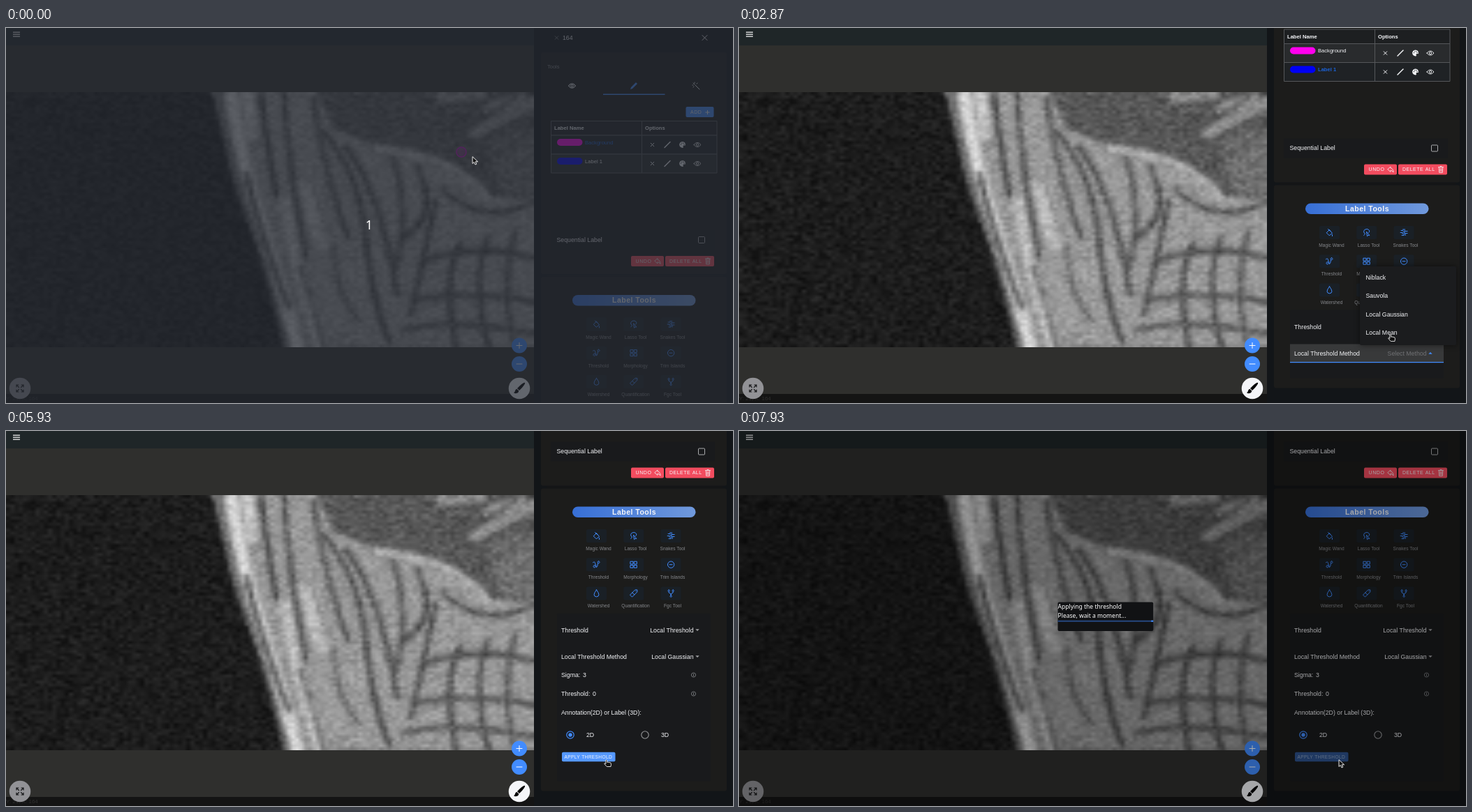
Recreate the animation shown at these times as an HTML page with a canvas. Size 1041 px wide and 538 px high, loop 8 s.

```html
<!DOCTYPE html>
<html lang="en">
<head>
<meta charset="utf-8">
<title>Local threshold</title>
<style>
html, body { margin: 0; width: 1041px; height: 538px; overflow: hidden; background: #121416 }
canvas { display: block }
</style>
</head>
<body>
<canvas id="stage" width="1041" height="538"></canvas>
<script>
const W = 1041, H = 538, LOOP = 8000;
const ctx = document.getElementById('stage').getContext('2d');
const SANS = '"Liberation Sans", Arial, sans-serif';
const HUMANIST = '"Noto Sans", "Open Sans", sans-serif';
const BLUE = '#428cff', RED = '#f24c5f', WHITE = '#f4f5f8', GREY = '#85878b';

// Keys are [time, values...]; an exponent above 0 eases in, below 0 eases out.
function track(t, keys, powers = []) {
  if (t <= keys[0][0]) return keys[0].slice(1);
  for (let i = 1; i < keys.length; i++) {
    const a = keys[i - 1], b = keys[i];
    if (t >= b[0]) continue;
    const u = (t - a[0]) / (b[0] - a[0]), p = powers[i - 1] || 1;
    const e = p > 0 ? u ** p : 1 - (1 - u) ** -p;
    return a.slice(1).map((v, k) => v + (b[k + 1] - v) * e);
  }
  return keys[keys.length - 1].slice(1);
}
const ramp = (t, from, to) => Math.min(1, Math.max(0, (t - from) / (to - from)));

function rect(x, y, w, h, fill, r = 0, stroke) {
  ctx.beginPath();
  ctx.roundRect(x, y, w, h, r);
  if (fill) { ctx.fillStyle = fill; ctx.fill(); }
  if (stroke) { ctx.strokeStyle = stroke; ctx.lineWidth = 1; ctx.stroke(); }
}
function circle(x, y, r, fill, stroke, width = 1) {
  ctx.beginPath();
  ctx.arc(x, y, r, 0, 7);
  if (fill) { ctx.fillStyle = fill; ctx.fill(); }
  if (stroke) { ctx.strokeStyle = stroke; ctx.lineWidth = width; ctx.stroke(); }
}
function text(s, x, y, o = {}) {
  ctx.font = `${o.bold ? 'bold ' : ''}${o.size || 8.75}px ${o.font || SANS}`;
  ctx.letterSpacing = (o.gap || 0) + 'px';
  ctx.textAlign = o.align || 'left';
  ctx.textBaseline = 'alphabetic';
  ctx.fillStyle = o.color || WHITE;
  ctx.fillText(s, x, y + (o.size || 8.75) * .35);
}
function icon(d, x, y, color, fill, width = 1) {
  const path = new Path2D(d);
  ctx.save();
  ctx.translate(x, y);
  ctx.lineWidth = width;
  ctx.lineCap = ctx.lineJoin = 'round';
  if (fill) { ctx.fillStyle = fill; ctx.fill(path); }
  if (color) { ctx.strokeStyle = color; ctx.stroke(path); }
  ctx.restore();
}

const ICON = {
  cross: 'M-2.3-2.3L2.3 2.3M2.3-2.3L-2.3 2.3',
  slash: 'M-4 4L4-4',
  eye: 'M-5 0Q0-6.4 5 0Q0 6.4-5 0ZM-1.7 0a1.7 1.7 0 1 0 3.4 0a1.7 1.7 0 1 0-3.4 0',
  palette: 'M0-4.4A4.4 4.4 0 1 0 1 4.3Q2 3.6 1 2.6Q.6 1 2.4 1H4.3Q5-4 0-4.4Z',
  pencil: 'M-5 5L-4 2L3-5L5-3L-2 4Z',
  wand: 'M-1-1L5 5M-2-2L-4-4M-2-5V-4M2-4L1-3M-5-1H-4M-4 2L-3 1',
  undo: 'M-4-.5L0-4V-2Q4-1.5 4 4Q2.5 1.2 0 1.2V3Z',
  trash: 'M-3.5-3.4H3.5M-1-3.4V-4.4H1V-3.4M-2.8-3.4L-2.3 4.4H2.3L2.8-3.4M-.9-1.5V2.6M.9-1.5V2.6',
  brush: 'M8-8Q9-7 4-1L0 3L-3 0L1-4Q7-9 8-8ZM-3.7.7L-.8 3.6Q-1 7-5 7.3Q-7 7.2-8 6Q-6.2 5.8-6 3.5Q-5.5 1.2-3.7.7Z',
  expand: 'M-5-2V-5H-2M-5-5L-1.5-1.5M5-2V-5H2M5-5L1.5-1.5M-5 2V5H-2M-5 5L-1.5 1.5M5 2V5H2M5 5L1.5 1.5',
  arrow: 'M0 0V9.5L2.3 7.4L4 11L5.8 10.2L4.2 6.8H7.2Z',
  hand: 'M0 0Q1.2-.8 1.7.5V3.2Q4 2.8 7 4.2Q8 5 7 9.5H1.3Q-1.5 6.8-2.3 5Q-1.8 3.8-.3 5.2Z'
};
const TOOLS = [
  ['Magic Wand', 'M-4 0L0-4L4 1L0 4ZM-2-5L1-2M4 3V5'],
  ['Lasso Tool', 'M-4 4Q-1 1-4 0Q-5-5 1-5Q6-3 3 0M0-1L4 4L2 4L1 5Z'],
  ['Snakes Tool', 'M-4-3H-1V-5M1-5V-2H5M-5 0H-2V2M5 1H2V4M-3 4H0V1M-1-1H1V1'],
  ['Threshold', 'M-5-3Q-2-5-2-2L0 4Q2 2 2-2M-3 1a1.6 1.6 0 1 0 .1 0M3-5a1.5 1.5 0 1 0 .1 0'],
  ['Morphology', 'M-4.5-4.5H-.8V-.8H-4.5ZM.8-4.5H4.5V-.8H.8ZM-4.5.8H-.8V4.5H-4.5ZM.8.8H4.5V4.5H.8Z'],
  ['Trim Islands', 'M-4.7 0a4.7 4.7 0 1 0 9.4 0a4.7 4.7 0 1 0-9.4 0M-2 0H2'],
  ['Watershed', 'M0-5Q7 4 0 5Q-7 4 0-5Z'],
  ['Quantification', 'M-5 2L2-5H5V-2L-2 5ZM-2-1L1 2M3-3H3.1'],
  ['Fgc Tool', 'M-3-2.5V-1Q0 0 0 2V3M3-2.5V-1Q0 0 0 2M-3-5a1.2 1.2 0 1 0 .1 0M3-5a1.2 1.2 0 1 0 .1 0M0 3a1.2 1.2 0 1 0 .1 0']
];

// Soft grey impression of the scan, softened and grained on a coarse grid.
function makeScan() {
  const w = 756, h = 366, big = new OffscreenCanvas(w, h), g = big.getContext('2d');
  const grey = v => `rgb(${v},${v},${v})`;
  const shape = (d, v) => { g.fillStyle = grey(v); g.fill(new Path2D(d)); };
  const line = (d, v, width) => { g.strokeStyle = grey(v); g.lineWidth = width; g.stroke(new Path2D(d)); };
  shape('M0 0H756V366H0Z', 29);
  g.translate(0, -92);
  g.filter = 'blur(2px)';
  g.lineCap = 'round';
  shape('M296 92L330 230L368 335L405 458H770V80H296Z', 152);
  line('M303 88Q322 200 352 280T402 462', 105, 9);
  line('M321 88Q336 190 367 285T418 462', 212, 17);
  line('M345 88L352 150', 195, 18);
  line('M400 250Q415 350 450 455M427 230L450 310', 190, 17);
  shape('M440 85H770V250L690 240L640 202L585 182L530 170L470 145Z', 88);
  shape('M690 160L765 140V250L705 235Z', 112);
  line('M625 100L680 92M690 118L735 100M670 150L756 108', 140, 18);
  const channels = [
    'M365 95Q372 160 387 240', 'M398 95Q402 190 430 330', 'M440 100Q450 190 490 300',
    'M455 150Q506 210 515 300T548 448', 'M485 170Q535 230 560 380', 'M553 186Q580 260 558 345',
    'M590 200Q622 270 570 300', 'M615 250Q600 320 580 410', 'M625 232Q680 285 756 250',
    'M650 310Q624 360 645 458', 'M690 300Q665 365 692 458', 'M730 290Q705 370 730 458',
    'M595 335Q675 305 756 330', 'M585 390Q660 375 756 392', 'M570 432Q640 415 756 438',
    'M345 210Q362 290 404 400', 'M420 340Q440 400 455 458', 'M470 310Q470 390 510 420',
    'M640 145Q690 135 735 92', 'M680 192Q735 170 756 140'
  ];
  channels.forEach((d, i) => line(d, 72 + i * 7 % 20, i > 15 ? 5 : 8));
  line('M530 172Q610 180 650 207T692 248', 182, 9);
  line('M595 208Q640 215 672 242', 165, 6);

  const cols = 126, rows = 84, small = new OffscreenCanvas(cols, rows), s = small.getContext('2d');
  s.imageSmoothingQuality = 'high';
  s.drawImage(big, 0, 0, cols, rows);
  const img = s.getImageData(0, 0, cols, rows), px = img.data;
  let seed = 7;
  const random = () => (seed = seed * 16807 % 2147483647) / 2147483647;
  for (let i = 0; i < px.length; i += 4) {
    const n = (random() + random() - 1) * (px[i] < 50 ? 16 : 24);
    for (let k = 0; k < 3; k++) px[i + k] += n;
  }
  s.putImageData(img, 0, 0);
  return small;
}
const scan = makeScan();

function viewer(t) {
  rect(0, 0, 756, 25, '#1f2628');
  rect(0, 25, 756, 500, '#2f2f2d');
  rect(0, 525, 756, 13, '#141414');
  ctx.drawImage(scan, 0, 92, 756, 366);
  for (const y of [6, 9, 12]) rect(10, y - .5, 10, 1.2, '#fff');
  text('Y: 21, X: 164', 0, 531, { size: 8, color: '#303030' });
  if (t < 250) circle(652, 178, 7, 'rgba(200,0,200,.25)', '#c010c0', 1.5);
  circle(735, 455.5, 11, BLUE);
  circle(735, 482, 11, BLUE);
  icon('M-4 0H4M0-4V4', 735, 455.5, '#fff');
  icon('M-4 0H4', 735, 482, '#fff');
  circle(735, 517, 15.3, WHITE);
  icon(ICON.brush, 735, 517, null, '#000');
  circle(20, 517, 15.3, '#929296');
  icon(ICON.expand, 20, 517, '#18191b', null, 1.2);
}

function labelRow(y, name, swatch, selected, fill) {
  rect(780.5, y, 237.5, 27, fill, 0, '#55575a');
  rect(789, y + 5, 36.5, 10, swatch, 5);
  text(name, 829, y + 10, { size: 7.6, bold: selected && name !== 'Background', color: selected ? '#1c62d8' : WHITE });
  icon(ICON.cross, 925.5, y + 13.5, WHITE);
  icon(ICON.slash, 947, y + 13.5, WHITE, null, 1.4);
  icon(ICON.palette, 968.5, y + 13.5, null, WHITE);
  for (const [dx, dy] of [[-2, -.5], [-.8, -2.4], [1.4, -2.2], [2.6, -.4]]) circle(968.5 + dx, y + 13.5 + dy, .7, fill);
  icon(ICON.eye, 990, y + 13.5, WHITE, null, .9);
}

function select(label, value, y, open, dim) {
  if (open) {
    rect(789, y - 13, 220, 26, '#38393a');
    rect(789, y + 12.5, 220, 1.3, BLUE);
  }
  text(label, 795, y);
  text(value, 984.5, y, { align: 'right', color: dim ? '#707174' : WHITE });
  icon(open ? 'M-2.7 1.3H2.7L0-1.5Z' : 'M-2.7-1.3H2.7L0 1.5Z', 990, y, null, open ? BLUE : '#a0a1a3');
}

function panel(t) {
  const chosen = t >= 3600, labelPicked = t >= 870;
  const bottom = chosen ? 777 : 634;
  const [scroll] = track(t, [[1230, 0], [1470, 122.5], [1540, 131.5], [3860, 131.5], [3930, 161.5], [4130, 268], [4200, 274.5]]);
  ctx.save();
  ctx.beginPath();
  ctx.rect(756, 0, 285, H);
  ctx.clip();
  rect(756, 0, 285, H, '#121518');
  ctx.translate(0, -scroll);

  rect(766, 35, 266, 318, '#1c1c1b', 3);
  rect(766, 357, 266, bottom + 14 - 357, '#1c1c1b', 3);
  rect(774, 354, 252, 2, '#151616');
  icon(ICON.cross, 788.5, 14, GREY, null, .8);
  text('164', 797, 14);
  icon('M-3.5-3.5L3.5 3.5M3.5-3.5L-3.5 3.5', 1000.5, 14, WHITE);
  text('Tools', 775, 55, { size: 7.5, color: GREY });
  icon(ICON.eye, 810.5, 83, WHITE, null, 1.1);
  icon(ICON.pencil, 899, 83, null, BLUE);
  icon(ICON.wand, 988, 83, WHITE);
  rect(855, 94.5, 88.5, 1.5, BLUE);
  rect(973.5, 113, 40, 15, BLUE, 2);
  text('ADD', 980, 121, { size: 7, gap: .5 });
  icon('M-2.7 0H2.7M0-2.7V2.7', 1004.5, 121, WHITE);

  rect(780.5, 133.5, 237.5, 20.5, '#1d1f21', 0, '#55575a');
  text('Label Name', 785, 143.5, { size: 7.6, bold: true });
  text('Options', 915, 143.5, { size: 7.6, bold: true });
  labelRow(154, 'Background', '#f0e', !labelPicked, labelPicked ? '#292b2d' : '#1f2225');
  labelRow(181, 'Label 1', '#0000f5', labelPicked, labelPicked ? '#1f2225' : '#292b2d');
  rect(910, 133.5, 1, 74.5, '#55575a');

  rect(780, 290, 235, 28, '#191a1c');
  text('Sequential Label', 788.5, 303.7);
  rect(991.5, 299.5, 9, 9, null, 1, '#a9aaac');
  rect(895, 327, 47, 15, RED, 2);
  text('UNDO', 901.5, 334.5, { size: 7, gap: .6 });
  icon(ICON.undo, 933, 334.5, WHITE, null, .8);
  rect(944, 327, 70, 15, RED, 2);
  text('DELETE ALL', 950, 334.5, { size: 7, gap: .5 });
  icon(ICON.trash, 1005, 334.5, WHITE, null, .8);

  const shine = ctx.createLinearGradient(811, 0, 987, 0);
  shine.addColorStop(0, '#376fd6');
  shine.addColorStop(1, '#7099dc');
  rect(811, 383, 176.5, 15.6, shine, 8);
  text('Label Tools', 899.5, 390.5, { size: 10.5, bold: true, gap: .5, align: 'center' });
  TOOLS.forEach(([name, d], i) => {
    const x = 845.5 + i % 3 * 53.3, y = 425 + (i / 3 | 0) * 41.2;
    rect(x - 14.5, y - 9.5, 29, 19, '#1a2026', 2);
    icon(d, x, y, BLUE);
    text(name, 848.5 + i % 3 * 53, y + 18.2, { size: 6.6, color: GREY, align: 'center' });
  });

  rect(789, 536, 220, bottom - 536, '#191a1c', 2);
  select('Threshold', 'Local Threshold', 560, false);
  const open = t >= 2500 && t < 3530;
  select('Local Threshold Method', chosen ? 'Local Gaussian' : 'Select Method', 598, open, !chosen);
  if (chosen) settings(t);
  ctx.restore();
}

function settings(t) {
  [['Sigma:', '3', 826], ['Threshold:', '0', 840]].forEach(([label, value, x], i) => {
    const y = 624.5 + i * 27;
    text(label, 795, y);
    text(value, x, y);
    circle(984.5, y, 3.1, null, GREY, .8);
    icon('M0-.4V1.6M0-1.6V-1.5', 984.5, y, GREY, null, .8);
  });
  text('Annotation(2D) or Label (3D):', 795, 678.2);
  circle(808, 710.5, 5.2, null, BLUE, 1.2);
  circle(808, 710.5, 2.7, BLUE);
  text('2D', 831, 710);
  circle(915, 710.5, 5.2, null, '#97989a', 1.1);
  text('3D', 938, 710);

  ctx.save();
  if (t >= 6050) ctx.globalAlpha = .5;
  rect(796, 735.3, 76.5, 13.5, t >= 4800 && t < 6050 ? '#5598ff' : BLUE, 2);
  const press = ramp(t, 5400, 5700), fade = 1 - ramp(t, 5700, 5930);
  if (press && fade) {
    ctx.save();
    ctx.clip();
    circle(860, 747, 80 * press, `rgba(255,255,255,${.2 * fade})`);
    ctx.restore();
  }
  text('APPLY THRESHOLD', 799.5, 742.2, { size: 6.6, gap: .35 });
  ctx.restore();
}

function popup(t) {
  const alpha = ramp(t, 2470, 2600) * (1 - ramp(t, 3430, 3560));
  if (!alpha) return;
  ctx.save();
  ctx.globalAlpha = alpha;
  ctx.shadowColor = 'rgba(0,0,0,.5)';
  ctx.shadowBlur = 8;
  rect(889, 342, 138, 113, '#1b1c1e', 2);
  ctx.shadowBlur = 0;
  ['Niblack', 'Sauvola', 'Local Gaussian', 'Local Mean'].forEach((s, i) => text(s, 897.5, 358 + i * 26.3));
  ctx.restore();
}

function loading(t) {
  if (t < 6050) return;
  rect(0, 0, W, H, `rgba(0,0,0,${track(t, [[6050, .1], [6130, .2], [6330, .32]])[0]})`);
  const [k] = track(t, [[6050, .94], [6130, .952], [6300, 1]]);
  ctx.save();
  ctx.globalAlpha = ramp(t, 6040, 6120);
  ctx.translate(456.5, 245.5);
  ctx.scale(k, k);
  rect(0, 0, 136.7, 41.5, '#111214', 2);
  const style = { size: 8.55, font: HUMANIST, color: '#fff' };
  text('Applying the threshold', 0, 6.7, style);
  text('Please, wait a moment...', 0, 19.7, style);
  rect(0, 26.2, 136.7, 2, '#26477f');

  // Two bars sweep across; each has a centre and a width in percent of the track.
  const p = (t - 6050) % 2000 / 20;
  const bars = [
    [track(p, [[20, -95.2], [59.15, -11.5], [100, 105.4]], [1.5, -2]),
     track(p, [[36.65, 8], [69.15, 66.1], [100, 8]], [1, -2])],
    [track(p, [[0, -4.9], [25, 32.8], [48.35, 79.5], [100, 155.4]].map(q => q), [1.3, 1, -1.2]),
     track(p, [[0, 8], [19.15, 45.7], [44.15, 72.8], [100, 8]], [1.3, 1, -1.5])]
  ];
  for (const [[mid], [width]] of bars) {
    const from = Math.max(0, mid - width / 2), to = Math.min(100, mid + width / 2);
    if (to > from) rect(from * 1.367, 26.2, (to - from) * 1.367, 2, BLUE);
  }
  ctx.restore();
}

function pointer(t) {
  const [x, y] = track(t, [
    [70, 668, 185], [600, 840, 188], [1270, 840, 188], [1400, 855, 235], [1530, 855, 235],
    [2070, 930, 455], [2130, 930, 455], [2200, 930, 456], [2600, 930, 456], [2870, 932, 440],
    [3200, 930, 411], [3700, 930, 411], [3900, 926, 412], [4400, 926, 412], [4860, 859, 472]
  ]);
  const hand = t > 550 && t < 1300 || t > 2130 && t < 3500 || t > 4800 && t < 6050;
  icon(hand ? ICON.hand : ICON.arrow, x, y, hand ? '#eee' : '#fff', '#111', .9);
}

function countdown(t) {
  const alpha = 1 - ramp(t, 60, 560);
  if (!alpha) return;
  ctx.save();
  ctx.globalAlpha = alpha;
  rect(0, 0, W, H, 'rgba(37,42,50,.7)');
  text('1', 520, 282.5, { size: 18, font: HUMANIST, align: 'center', color: '#fff' });
  ctx.restore();
}

function frame(now) {
  const t = now % LOOP;
  viewer(t);
  panel(t);
  popup(t);
  loading(t);
  countdown(t);
  pointer(t);
  requestAnimationFrame(frame);
}
requestAnimationFrame(frame);
</script>
</body>
</html>
```
